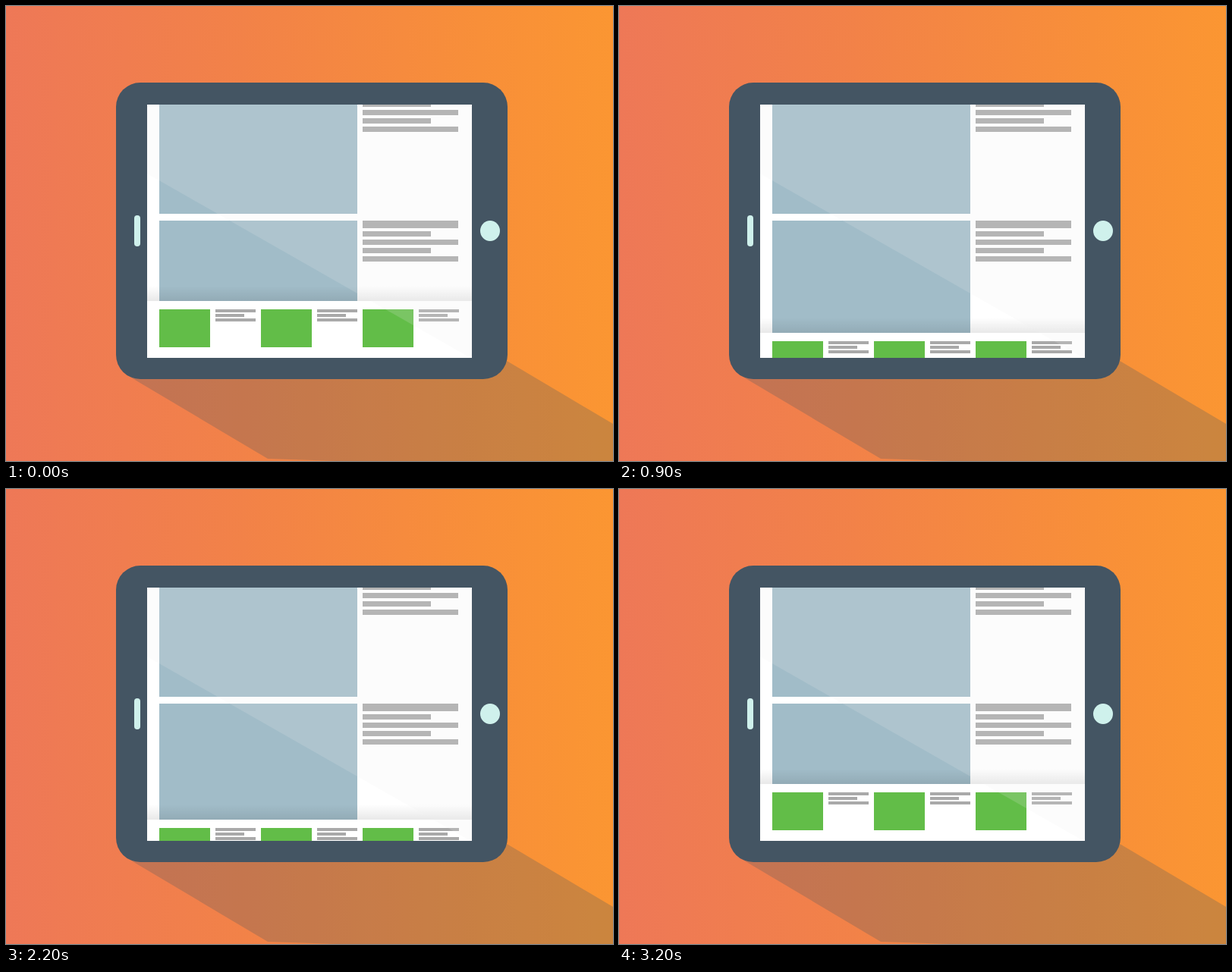
Animation, 800 px wide and 600 px high, one loop 3300 ms. Source, as an HTML page:

```html
<!DOCTYPE html>
<html lang="en">
<head>
<meta charset="utf-8">
<title>Tablet with sliding panel</title>
<style>
  html, body { margin: 0; width: 100%; height: 100%; overflow: hidden; }
  .stage {
    position: relative; width: 800px; height: 600px; overflow: hidden;
    background: linear-gradient(90deg, #ee7857, #f28248 39%, #f88f39 78%, #fb9632);
  }
  .stage *, .screen::after { position: absolute; }
  .cast {
    inset: 0; background: #445563; opacity: .26;
    clip-path: polygon(165px 490px, 345px 597px, 435px 600px, 800px 600px, 800px 551px, 655px 465px);
  }
  .tablet { left: 145px; top: 101px; width: 516px; height: 391px; border-radius: 32px; background: #445563; }
  .speaker { left: 24px; top: 175px; width: 8px; height: 41px; border-radius: 4px; background: #cff1ec; }
  .home { left: 480px; top: 182px; width: 26px; height: 27px; border-radius: 50%; background: #cff1ec; }
  .screen { left: 41px; top: 29px; width: 428px; height: 334px; overflow: hidden; background: #fff; }

  .photo { left: 16px; width: 261px; background: #a1bcc8; }
  .lines { left: 284px; }
  .lines i { width: 126px; height: 7px; background: #a9a9a9; }
  .lines i.short { width: 90px; }

  .panel { left: 0; top: 259px; width: 428px; height: 75px; background: #fff; animation: slide 3300ms infinite; }
  .panel::before {
    content: ""; position: absolute; left: 0; top: -20px; width: 100%; height: 20px;
    background: linear-gradient(rgba(0, 0, 0, 0), rgba(0, 0, 0, .09));
  }
  .item { top: 11px; }
  .item b { width: 67px; height: 50px; background: #62bd48; }
  .item i { left: 74px; width: 53px; height: 4px; background: #a9a9a9; }
  .item i:nth-of-type(2) { top: 6px; width: 38px; }
  .item i:nth-of-type(3) { top: 12px; }

  /* glass reflection */
  .screen::after {
    content: ""; inset: 0; background: rgba(237, 237, 237, .17);
    clip-path: polygon(0 0, 100% 0, 100% 335px, 0 91px);
  }

  /* stops sit a hair early so each step lands on its 100 ms mark */
  @keyframes slide {
    0% { top: 259px; animation-timing-function: steps(16, end); }
    48.4847% { top: 334px; animation-timing-function: steps(16, end); }
    96.9695%, 100% { top: 259px; }
  }
</style>
</head>
<body>
<div class="stage">
  <div class="cast"></div>
  <div class="tablet">
    <div class="speaker"></div>
    <div class="home"></div>
    <div class="screen">
      <div class="photo" style="top:0;height:144px"></div>
      <div class="photo" style="top:153px;height:158px"></div>
      <div class="lines" style="top:-4px">
        <i class="short"></i>
        <i style="top:11px"></i>
        <i class="short" style="top:22px"></i>
        <i style="top:33px"></i>
      </div>
      <div class="lines" style="top:153px">
        <i style="height:10px"></i>
        <i class="short" style="top:14px"></i>
        <i style="top:25px"></i>
        <i class="short" style="top:36px"></i>
        <i style="top:47px"></i>
      </div>
      <div class="panel">
        <div class="item" style="left:16px"><b></b><i></i><i></i><i></i></div>
        <div class="item" style="left:150px"><b></b><i></i><i></i><i></i></div>
        <div class="item" style="left:284px"><b></b><i></i><i></i><i></i></div>
      </div>
    </div>
  </div>
</div>
</body>
</html>
```
